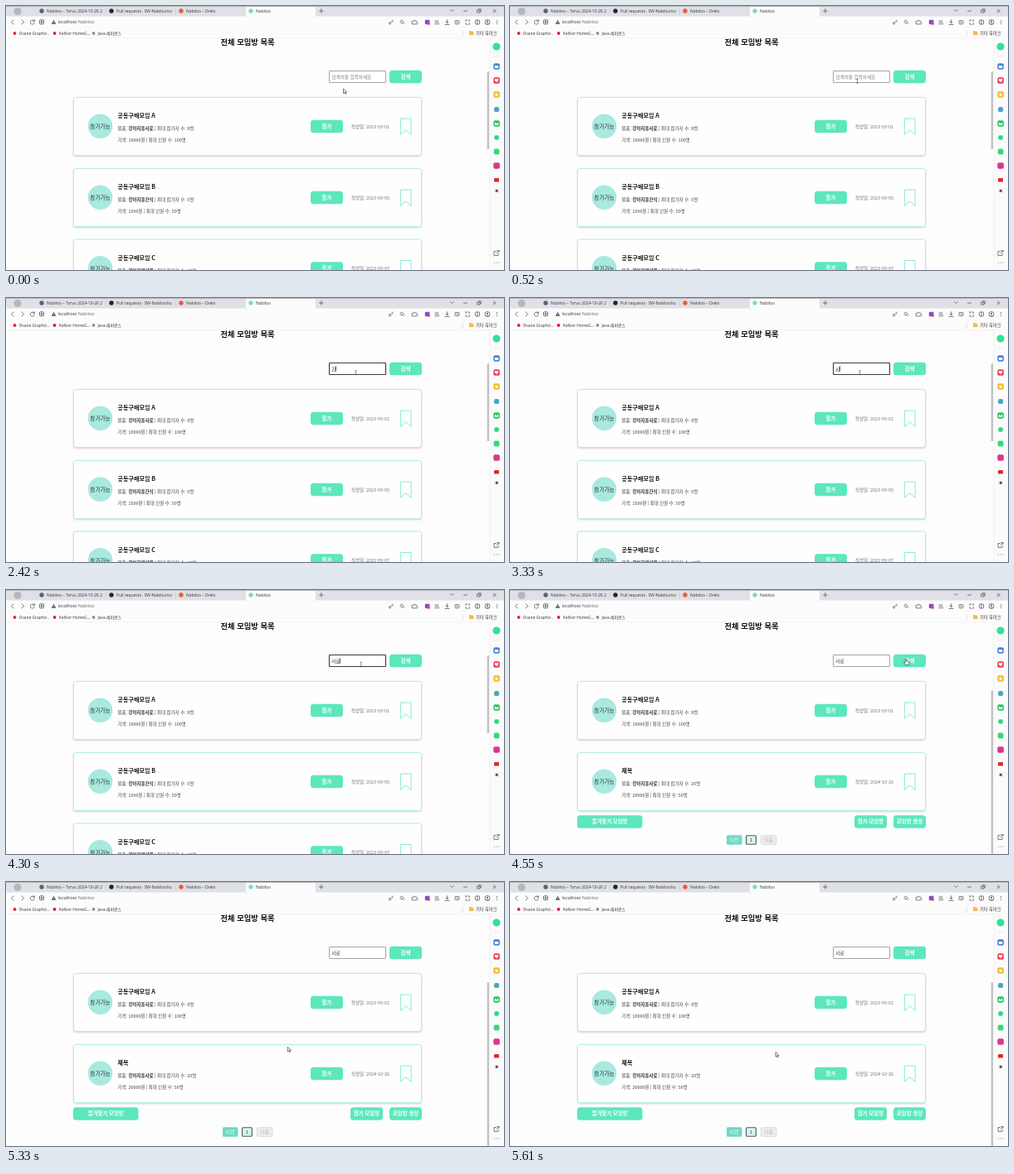
Animation of 600x319 px, one loop 6.09 s. Source, as an HTML page:

```html
<!DOCTYPE html>
<html lang="ko">
<head>
<meta charset="utf-8">
<title>모임방 목록</title>
<style>
html, body { margin: 0; width: 100%; height: 100%; overflow: hidden; background: #fdfdfd; }
svg { display: block; width: 100vw; height: 100vh; }
text { font-family: "Noto Sans CJK KR", "Noto Sans CJK JP", "Noto Sans CJK", "Noto Sans", sans-serif; white-space: pre; }
.ui { font-family: "Open Sans", "Noto Sans CJK KR", "Noto Sans CJK JP", sans-serif; }
.card { fill: #fefefe; stroke: #b0f1dc; stroke-width: 1; filter: drop-shadow(0 1px 1px rgba(0, 0, 0, .17)); }
.line { fill: none; stroke: #555; stroke-width: .75; stroke-linecap: round; stroke-linejoin: round; }
</style>
</head>
<body>
<svg id="stage" viewBox="0 0 600 319"></svg>
<script>
const LOOP = 6090, MINT = '#5ce7bd';
const FIELD = { x: 389.5, y: 78.5, w: 68, h: 14 };
const SEARCH = { x: 462, y: 77.7, w: 39, h: 15.6 };
const stage = document.getElementById('stage');

const rect = (x, y, w, h, fill, r = 0, more = '') =>
  `<rect x="${x}" y="${y}" width="${w}" height="${h}" rx="${r}" fill="${fill}" ${more}/>`;
const dot = (x, y, r, fill) => `<circle cx="${x}" cy="${y}" r="${r}" fill="${fill}"/>`;
const line = (d, more = '') => `<path class="line" d="${d}" ${more}/>`;
const text = (x, y, size, str, fill = '#222', more = '') =>
  `<text x="${x}" y="${y}" font-size="${size}" fill="${fill}" ${more}>${str}</text>`;
const MID = 'text-anchor="middle"', BOLD = 'font-weight="700"', UI = 'class="ui"';

const button = (x, y, w, label, h = 15.6) =>
  rect(x, y, w, h, MINT, 3.6) + text(x + w / 2, y + h / 2 + 2.4, 6.4, label, '#fff', `${MID} ${BOLD}`);

function card(y, [name, item, seats, price, total, date]) {
  return `<rect class="card" x="81.5" y="${y + .5}" width="419" height="70" rx="3"/>`
    + dot(113.5, y + 35.3, 14.8, '#a9e9df')
    + text(113.5, y + 38.1, 6.6, '참가가능', '#263b38', `${MID} font-weight="500"`)
    + text(134.5, y + 25.4, 7.05, name, '#151515', BOLD)
    + text(134.5, y + 40.3, 5.45, `물품: <tspan font-weight="700" fill="#333">${item}</tspan> | 최대 참가자 수: ${seats}명`, '#444')
    + text(134.5, y + 53.7, 5.4, `가격: ${price}원 | 최대 인원 수: ${total}명`, '#444')
    + button(367, y + 27.8, 39, '참가', 15.5)
    + text(416, y + 37.7, 5.45, '작성일: ' + date, '#707070')
    + `<path d="M475.3 ${y + 26}h12.8v19.5l-6.4 -5.8l-6.4 5.8z" fill="none" stroke="#86ead0"/>`;
}

function chrome() {
  let s = rect(0, 0, 600, 13, '#dfe1e6') + rect(0, 0, 600, .6, '#9a9a9a')
    + rect(0, 12.5, 600, 26.5, '#fcfcfc') + rect(0, 38.6, 600, .6, '#e8e8e8')
    + rect(289, 1, 84, 13, '#fcfcfc', 2);
  // tabs
  const tabs = [
    [43, '#53657d', 'Nabiloo – Torvu 2024-10-26 21', 67],
    [127, '#22262b', 'Pull requests · SW-Nabiloo/nabi', 67],
    [211, '#ee5a3c', 'Nabiloo – Drelo', 65],
    [295, '#7bdcc0', 'Nabiloo', 60],
  ];
  s += dot(14, 6.5, 4.5, '#b4b7bc');
  for (const [x, color, label, w] of tabs)
    s += dot(x, 6, 2.7, color)
      + `<svg x="${x + 6}" y="0" width="${w}" height="13">${text(0, 7.9, 4.95, label, '#333', UI)}</svg>`;
  for (const x of [120, 204]) s += rect(x, 3, .5, 7, '#bbb');
  s += line('M377.5 6h4.6M379.8 3.7v4.6')
    + line('M535.5 4.5l2 2l2-2M551.5 6h4M568 5h3v3h-3zM569.3 5v-1.2h3v3h-1.2M586.8 4.2l3.6 3.6M590.4 4.2l-3.6 3.6');
  // toolbar
  s += line('M9 17l-2.5 2.5l2.5 2.5M19 17l2.5 2.5l-2.5 2.5')
    + line('M34 18a2.6 2.6 0 1 0 .4 2.4M34.4 16.6v1.8h-1.8')
    + rect(40.5, 16.8, 5, 5, 'none', 1, 'stroke="#444" stroke-width=".8"') + rect(42, 18.3, 2, 2, '#444')
    + `<path d="M57.5 16.8l2.8 5h-5.6z" fill="#555"/>` + rect(57.2, 18.5, .6, 1.8, '#fff')
    + text(62.5, 21.4, 5.45, 'localhost <tspan fill="#666">Nabiloo</tspan>', '#333', UI);
  s += line('M462.5 19.8a1.2 1.2 0 1 0 .1 0M463.6 19.8l2.8-2.8M465.2 18.2l1 1')
    + line('M476.8 17.2a1.8 1.8 0 1 0 .1 0M478.2 20.5l1.3 1.3')
    + line('M489.5 18.3h1.8a1.1 1.1 0 0 1 2.2 0h1.3v1.4a1.1 1.1 0 0 1 0 2.2h-5.3z')
    + rect(504.8, 16.7, 5.6, 5.6, '#8b4bcb', 1) + dot(509.5, 21.5, 1.4, '#e44c62')
    + line('M517 18h4M517 20h3M517 22h2M521 20v2.5')
    + line('M531.5 16.7v4M529.8 19l1.7 1.7l1.7-1.7M529 22.5h5')
    + rect(541, 17.5, 5, 4.3, 'none', 1, 'stroke="#555" stroke-width=".75"') + line('M542.5 19.7h2')
    + line('M554 17h1.3M557 17h1.3v1.5M558.3 20.7v1.5h-1.3M555.3 22.2h-1.3v-1.5M554 18.5v-1.5')
    + rect(565.5, 17, 5, 5, 'none', .7, 'stroke="#555" stroke-width=".75"') + line('M568 17v5')
    + `<circle cx="580" cy="19.5" r="3" fill="none" stroke="#555" stroke-width=".75"/>` + dot(580, 18.7, 1, '#555') + line('M578.4 21.5q1.6-1.7 3.2 0');
  for (const y of [17.5, 19.5, 21.5]) s += dot(591.5, y, .55, '#444');
  // bookmarks
  s += dot(10.5, 33, 1.9, '#e3282e') + text(15.5, 35, 4.9, 'Ovane Graphic...', '#333', UI)
    + dot(58.5, 33, 1.9, '#d82132') + text(64, 35, 4.9, 'Kelbor HomeG...', '#333', UI)
    + dot(105.5, 33, 1.9, '#8f9499') + text(110.5, 35, 4.9, 'Java 레퍼런스', '#333', UI)
    + rect(550, 29.5, .5, 7, '#ccc') + rect(558, 30.8, 5.5, 4.5, '#f5bf4a', .6) + rect(558, 30.2, 2.5, 1.5, '#e9ad32', .4)
    + text(566, 35, 5.2, '기타 북마크', '#333', UI);
  return s;
}

function sidebar() {
  let s = rect(583, 39, 17, 280, '#fbfbfb') + rect(582.7, 39, .5, 280, '#e6e6e6')
    + dot(591, 49, 4.6, '#35e092') + rect(587, 60.5, 8, .5, '#ddd');
  const icons = [[73, '#4d86d9'], [90, '#ec4055'], [107, '#f5bd2b'], [125, '#4ba7c4', 3],
    [142, '#28c765'], [159, '#31d97b', 2.8], [176, '#34d97b', 3.4], [193, '#d9388d']];
  for (const [y, color, r = 3.8] of icons) s += rect(591.1 - r, y - r, r * 2, r * 2, color, 1.8);
  // white marks: bag, heart, star, envelope
  s += `<path d="M589 72h4.2v3h-4.2zM591.1 92.3l-2.2-2.2a1.2 1.2 0 0 1 2.2-1.3a1.2 1.2 0 0 1 2.2 1.3z
    M591.1 104.7l.7 1.5l1.7.2l-1.2 1.2l.3 1.7l-1.5-.8l-1.5.8l.3-1.7l-1.2-1.2l1.7-.2z
    M588.9 140.5l2.2 1.8l2.2-1.8v3.2h-4.4z" fill="#fff"/>`;
  return s + rect(588, 208, 6, 4.6, '#e02a2a', 1.2)
    + rect(588, 220, 6.5, 6.5, '#eee', 1.5) + dot(591.2, 223.2, 1.5, '#5c3540')
    + line('M590.5 296.5h-2.5v5h5v-2.5M591 298.5l3-3M591.8 295.5h2.2v2.2')
    + [588.5, 591, 593.5].map(x => dot(x, 310, .5, '#666')).join('');
}

const scrollbar = (y, h) => rect(579.6, y, 2.4, h, '#c2c2c2', 1);
const first = ['공동구매모임 A', '강아지용사료', 8, 10000, 100, '2023-09-01'];
const all = card(196, ['공동구매모임 B', '강아지용간식', 5, 1500, 50, '2023-09-05'])
  + card(281.5, ['공동구매모임 C', '강아지영양제', 10, 3000, 30, '2023-09-07'])
  + scrollbar(79, 94);
const found = card(196, ['제목', '강아지용사료', 20, 20000, 50, '2024-10-26'])
  + button(81, 272.2, 78.5, '즐겨찾기 모임방') + button(415, 272.2, 39, '참가 모임방') + button(462, 272.2, 39, '모임방 생성')
  + rect(261, 296.3, 18.5, 11.4, '#70d9c2', 1.5) + text(270.2, 304.1, 5.6, '이전', '#f5fffc', MID)
  + rect(284.6, 296.8, 11.8, 10.4, '#d9f3ec', 1, 'stroke="#45605a" stroke-width="1.1"') + text(290.5, 304, 5.4, '1', '#333', MID)
  + rect(302.4, 296.7, 18.6, 10.8, '#ececec', 1.5, 'stroke="#d5d5d5" stroke-width=".7"') + text(311.7, 304.1, 5.6, '다음', '#b0b0b0', MID)
  + scrollbar(121, 198);

stage.innerHTML = rect(0, 0, 600, 319, '#fdfdfd')
  + text(291, 47.4, 9.3, '전체 모임방 목록', '#111', `${MID} ${BOLD}`)
  + button(SEARCH.x, SEARCH.y, SEARCH.w, '검색')
  + rect(FIELD.x, FIELD.y, FIELD.w, FIELD.h, '#fff', .6, 'id="field"')
  + text(392.3, 87.5, 5.6, '', '#222', 'id="value"')
  + rect(392, 88.6, 5, .4, '#555', 0, 'id="under"') + rect(392, 82.4, .7, 6.2, '#222', 0, 'id="caret"')
  + card(110, first) + `<g id="all">${all}</g><g id="found">${found}</g>`
  + chrome() + sidebar()
  + `<g id="arrow"><path d="M0 0v5.6l1.3-1.2l.9 2l1-.4l-.9-2h1.8z" fill="#fff" stroke="#222" stroke-width=".6"/></g>
     <g id="beam"><path d="M-1-2.4h2M0-2.4v4.8M-1 2.4h2" fill="none" stroke="#444" stroke-width=".6"/></g>
     <g id="hand"><path d="M-.7 0q.7-.8 1.4 0v2.4l2.5.6q.7.3.6 1l-.5 3.2h-3.8l-2-3q.3-.9 1.8.3z" fill="#fff" stroke="#222" stroke-width=".6"/></g>`;
const $ = id => document.getElementById(id);

// pointer path: time, x, y
const path = [[0, 406.5, 100], [30, 406.7, 99.7], [200, 409, 97], [420, 416, 92], [610, 420.5, 90], [700, 421.5, 90],
  [4270, 421.5, 90], [4360, 440, 89], [4460, 469, 85.5], [4550, 477, 83.5], [4730, 477.5, 84],
  [5000, 477.5, 84], [5030, 466, 101], [5060, 440, 133], [5090, 416, 159], [5180, 376, 182],
  [5300, 343, 198], [5440, 326, 204], [5610, 320, 205.5], [LOOP, 320, 205.5]];
// field edits: time, value
const edits = [[850, ''], [1910, 'ㄱ'], [2420, '가'], [2670, 'ㄱ'], [2820, ''], [2970, 'ㅅ'], [3330, '사'], [3490, '살'], [3850, '사료']];
const CLICK = 4520, BLINK = 530;

function pointer(t) {
  const i = path.findIndex(p => p[0] > t);
  const [t0, x0, y0] = path[i - 1], [t1, x1, y1] = path[i];
  const k = (t - t0) / (t1 - t0);
  return [x0 + (x1 - x0) * k, y0 + (y1 - y0) * k];
}
const inside = (b, x, y) => x > b.x && x < b.x + b.w && y > b.y && y < b.y + b.h;
const show = (id, on) => $(id).setAttribute('visibility', on ? 'visible' : 'hidden');

function draw(t) {
  const [x, y] = pointer(t);
  const kind = inside(FIELD, x, y) ? 'beam' : inside(SEARCH, x, y) ? 'hand' : 'arrow';
  for (const id of ['arrow', 'beam', 'hand']) show(id, id === kind);
  $(kind).setAttribute('transform', `translate(${x} ${y})`);

  const [at, typed] = edits.filter(e => e[0] <= t).pop() || [0, ''];
  const focus = t >= 850 && t < CLICK;
  const field = $('field'), value = $('value');
  field.setAttribute('stroke', focus ? '#3c3c3c' : '#8c8c8c');
  field.setAttribute('stroke-width', focus ? 1.1 : .8);
  value.textContent = typed || '검색어를 입력하세요';
  value.setAttribute('fill', typed ? '#333' : '#808080');
  const end = 392 + typed.length * 5.15;
  $('caret').setAttribute('x', end);
  show('caret', focus && Math.floor((t - at) / BLINK) % 2 === 0);
  $('under').setAttribute('x', end - 5);
  show('under', focus && typed);
  show('all', t < CLICK);
  show('found', t >= CLICK);
}

function tick() {
  draw(performance.now() % LOOP);
  requestAnimationFrame(tick);
}
tick();
</script>
</body>
</html>
```
